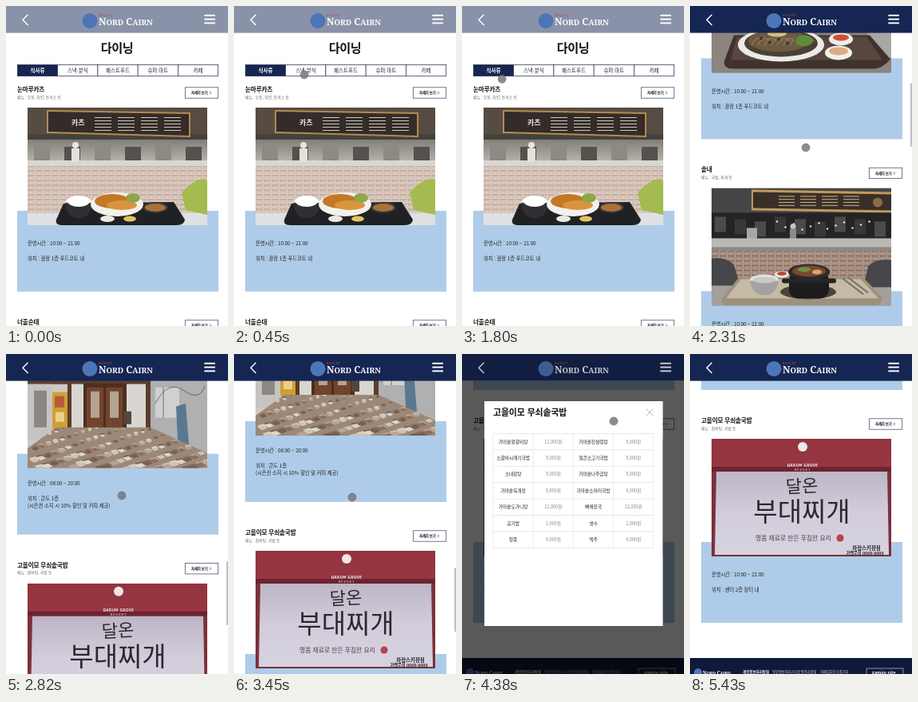
An HTML page for the animation above (5.46 s loop, 278x400 px).

```html
<!DOCTYPE html>
<html lang="ko">
<head>
<meta charset="utf-8">
<title>다이닝</title>
<style>
html, body { margin: 0; width: 100%; height: 100%; overflow: hidden; background: #fff; }
svg { display: block; }
#stage { width: 100vw; height: 100vh; }
text { font-family: "Noto Sans CJK KR", "Noto Sans CJK", "Noto Sans", sans-serif; }
.serif { font-family: "Noto Serif", "Liberation Serif", serif; }
</style>
</head>
<body>
<svg id="stage" viewBox="0 0 278 400" preserveAspectRatio="none"></svg>
<script>
const LOOP = 5460, PITCH = 291, FIRST = 104, FOOTER = 1856, PAGE = 2000;
const NAVY = '#152653', BLUE = '#aecce9', MARK = '#4d76b8';

// Drawing helpers
const rect = (x, y, w, h, fill, more = '') => `<rect x="${x}" y="${y}" width="${w}" height="${h}" fill="${fill}" ${more}/>`;
const oval = (x, y, rx, ry, fill, more = '') => `<ellipse cx="${x}" cy="${y}" rx="${rx}" ry="${ry}" fill="${fill}" ${more}/>`;
const disc = (x, y, r, fill, more) => oval(x, y, r, r, fill, more);
const shape = (d, fill) => `<path d="${d}" fill="${fill}"/>`;
const line = (d, color, width = 1) => `<path d="${d}" fill="none" stroke="${color}" stroke-width="${width}"/>`;
const text = (x, y, size, str, fill = '#222', more = '') =>
  `<text x="${x}" y="${y + size * 0.36}" font-size="${size}" fill="${fill}" ${more}>${str}</text>`;
const BOLD = 'font-weight="700" ', MID = 'text-anchor="middle" ';
const repeat = (n, fn) => Array.from({ length: n }, (_, i) => fn(i)).join('');

const bricks = (id, base, a, b) => `<pattern id="${id}" width="10" height="6" patternUnits="userSpaceOnUse">` +
  rect(0, 0, 10, 6, base) + rect(0, 0, 9, 2.4, a) + rect(-5, 3, 9, 2.4, b) + rect(5, 3, 9, 2.4, b) + '</pattern>';
const gradient = (id, ...stops) => `<linearGradient id="${id}" x2="0" y2="1">` +
  stops.map((c, i) => `<stop offset="${i / (stops.length - 1)}" stop-color="${c}"/>`).join('') + '</linearGradient>';
const defs = '<defs>' + bricks('brick', '#ddd2ca', '#c9aea2', '#d5c3b8') + bricks('darkBrick', '#b9a89c', '#8d6e60', '#a58d80') +
  gradient('panel', '#bdb5c4', '#d3cddb', '#d6d2e0') + gradient('kitchen', '#77736e', '#cfcac2') +
  gradient('awning', '#93343f', '#a33d48') + '</defs>';

// Photo scenes, each 225 x 147
const kitchen = () =>
  rect(0, 0, 225, 147, '#574c42') +
  rect(0, 34, 225, 46, 'url(#kitchen)') + rect(0, 33, 225, 7, '#45413d') +
  repeat(6, i => rect(8 + i * 38, 44 + i % 2 * 5, 20, 24, i % 2 ? '#55514c' : '#8e8982')) +
  rect(0, 66, 225, 7, '#d9d7d2') + rect(0, 73, 225, 74, 'url(#brick)');

const katsu = () => kitchen() +
  shape('M24 3L204 6L204 37L24 32Z', '#b48a50') + shape('M26 5L202 8L202 35L26 30Z', '#332c29') +
  text(55, 19, 9, '카츠', '#eee', BOLD) +
  repeat(4, i => repeat(5, j => rect(84 + i * 29, 12 + j * 4, 21, 1, '#cfc6b8'))) +
  disc(60, 47, 4, '#e9e4dd') + rect(55, 51, 10, 17, '#e4e1dc') +
  rect(0, 132, 225, 15, '#dfe0e3') +
  shape('M193 106Q212 86 225 90V134L198 128Z', '#a4bb50') +
  shape('M45 120L183 118L197 140Q196 147 187 147H43Q34 147 36 140Z', '#202124') +
  oval(64, 119, 17, 8, '#eeeeec') + shape('M47 119Q49 138 64 138Q79 138 81 119Z', '#303034') + oval(64, 117, 14, 7, '#fff') +
  oval(112, 121, 33, 15, '#f3f1ec') + oval(106, 117, 22, 9, '#c47827') + oval(118, 122, 19, 6, '#d9953d') + oval(132, 113, 9, 6, '#8ea64d') +
  oval(160, 125, 16, 7, '#3a3434') + oval(160, 125, 13, 5, '#a8713c') + oval(100, 139, 9, 4, '#eceae5') + oval(128, 139, 8, 3.5, '#e3c45e');

// Dim food court seen behind a table
const foodCourt = () =>
  rect(0, 0, 225, 147, '#464546') + shape('M50 2L225 5V31L50 28Z', '#c19a5c') + shape('M52 5L225 8V28L52 25Z', '#3a2f28') +
  repeat(4, i => repeat(4, j => rect(84 + i * 27, 10 + j * 3.8, 20, 1, '#c9b48d'))) + disc(208, 18, 6, '#8a6a48') +
  rect(0, 31, 225, 34, '#242325') + repeat(9, i => rect(4 + i * 25, 36 + i % 3 * 3, 14, 19, i % 2 ? '#38373a' : '#4c4a4b')) +
  repeat(12, i => disc(82 + i * 10.5, 42 + i * 7 % 11, 1.2, '#f2efe8')) +
  disc(102, 48, 3.5, '#cbc5bf') + rect(98, 51, 8, 13, '#8b8989') + rect(44, 50, 13, 22, '#a9a7a5') +
  rect(0, 63, 225, 16, '#bcb8b4') + rect(0, 74, 225, 5, '#8d8986') + rect(0, 79, 225, 68, 'url(#darkBrick)') +
  rect(0, 118, 225, 29, '#a39f9b') +
  shape('M0 88Q18 86 28 96L36 122H0ZM225 90Q205 88 196 98L190 124H225Z', '#47464a');

const noodles = () => foodCourt() +
  rect(0, 94, 225, 53, '#8c857e') + rect(195, 84, 30, 44, '#a9a7a6') +
  shape('M28 100H198L224 130Q214 142 202 142H28Q14 142 16 132Z', '#40332e') + shape('M32 102H194L214 131H24Z', '#57473f') +
  oval(87, 112, 54, 21, '#eceae6') + oval(87, 110, 46, 17, '#4a4034') + oval(84, 107, 38, 14, '#6d5a40') +
  repeat(9, i => line(`M${50 + i * 8} 113q7 -15 15 -5`, '#907a58', 1.2)) + repeat(6, i => disc(62 + i * 11, 104 + i * 5 % 9, 2, '#3f3529')) +
  oval(116, 107, 11, 7, '#5f8b3d') + oval(82, 98, 12, 4, '#d8bd78') +
  oval(162, 105, 15, 8, '#f0eeea') + oval(162, 103, 10, 4, '#cf5235') +
  oval(159, 122, 17, 9, '#f4f2ee') + oval(159, 120, 12, 5, '#dfab81');

const stew = () => foodCourt() +
  shape('M34 112H190L214 137Q213 147 203 147H24Q10 147 13 138Z', '#9d917c') + shape('M37 114H187L209 138H18Z', '#c5bba4') +
  oval(121, 130, 35, 9, '#4b443d') + rect(97, 105, 50, 33, '#1c1b1d', 'rx="11"') + rect(88, 113, 68, 6, '#252426', 'rx="3"') +
  oval(122, 105, 26, 10, '#2b292a') + oval(122, 104, 21, 7, '#7a4630') + oval(116, 102, 8, 3, '#6e9246') + oval(132, 105, 6, 3, '#d7a965') +
  oval(66, 115, 18, 7, '#e3e2e1') + shape('M48 116Q51 134 66 134Q81 134 84 116Z', '#a3a2a2') + oval(66, 115, 14, 4, '#c9c8c6') +
  oval(88, 108, 9, 4, '#eee') + oval(88, 107, 6, 2.5, '#bb4a34') + line('M164 113L190 133M171 112L196 131', '#77736d', 2);

const lobby = () =>
  rect(0, 0, 225, 147, '#cdc9c4') + rect(0, 0, 225, 36, '#b9b2a8') + rect(0, 36, 172, 6, '#59402f') +
  rect(50, 42, 104, 54, '#d9d6d1') + rect(0, 42, 30, 70, '#c6c4c1') + rect(8, 50, 16, 46, '#8b8884') +
  rect(31, 52, 19, 46, '#cf9f35') + rect(34, 57, 12, 14, '#b65a3a') + rect(35, 77, 11, 12, '#e9d288') +
  rect(70, 41, 54, 56, '#4d2e20') + repeat(2, i => rect(74 + i * 24, 46, 21, 50, '#71442c') + rect(79 + i * 24, 51, 11, 33, '#b5a392')) +
  rect(50, 40, 5, 60, '#5d3c2a') + rect(148, 40, 6, 60, '#5d3c2a') + rect(120, 76, 10, 16, '#54453d') +
  shape('M154 36L225 30V130L154 98Z', '#aeb0b2') + rect(160, 46, 30, 38, '#cfd0d1') +
  line('M160 66Q176 36 196 50T222 44M170 84V46', '#54565a', .8) + shape('M186 70L198 66L202 118L188 112Z', '#5a7890') +
  shape('M36 96H154L225 128V147H0V122Z', '#9b8878') +
  `<svg width="225" height="147"><clipPath id="floor"><path d="M36 96H154L225 128V147H0V122Z"/></clipPath><g clip-path="url(#floor)">` +
  repeat(190, i => {
    const y = 96 + 51 * (i * 0.618 % 1), x = 225 * (i * 0.7549 % 1), s = 2 + (y - 96) / 14;
    return shape(`M${x} ${y}l${s * 1.6} ${-s * .4}l${s} ${s * .7}l${-s * 1.4} ${s * .5}Z`, ['#cfc3b6', '#77604f', '#b9a591', '#ddd5cb', '#8b6f5c'][i % 5]);
  }) + '</g></svg>';

const banner = () =>
  rect(0, 0, 225, 147, 'url(#awning)') + rect(0, 35, 225, 6, '#6b2333') +
  rect(0, 41, 225, 106, '#7c303c') + shape('M6 41H220L222 145H4Z', 'url(#panel)') +
  disc(114, 10, 6, '#f0e6e7') +
  text(114, 33, 5, 'DARUM GROVE', '#f5e9ea', MID + BOLD + 'letter-spacing=".2"') + text(114, 38.5, 3.8, 'RESORT', '#f5e9ea', MID + 'letter-spacing="1"') +
  text(113, 59, 22, '달온', '#2c2830', MID + 'font-weight="500" transform="rotate(-3 113 59)"') +
  text(113, 91, 33, '부대찌개', '#2c2830', MID + 'font-weight="500"') +
  text(55, 124, 7.8, '명품 재료로 만든 푸짐한 요리', '#4a4046') + disc(161, 124, 4.5, '#b8404a') +
  text(194, 136.5, 6.4, '하람스키장점', '#222', MID + BOLD) + text(192, 143.2, 5.2, '가맹문의 0000-0000', '#222', MID + BOLD);

const burgers = () =>
  rect(0, 0, 225, 147, '#c9bcae') + shape('M116 0H225V32L116 24Z', '#9c8c80') +
  repeat(4, i => line(`M${126 + i * 27} 0L${140 + i * 25} 30`, '#5e4b42', 3)) + rect(172, 5, 53, 16, '#d8dde2') +
  rect(0, 0, 116, 147, '#454a52') + repeat(18, i => rect(0, i * 8, 116, 1, '#343940')) +
  shape('M116 20L225 34V53L116 47Z', '#b83c31') + shape('M116 31L225 41V44L116 36Z', '#e9dcd2') + disc(166, 41, 6, '#e9a04a') +
  shape('M116 48L225 54V90L116 89Z', '#574a43') +
  repeat(5, i => rect(119 + i * 15, 51 + i * .6, 13, 16, i % 2 ? '#e4d9c9' : '#d9a36c')) + rect(198, 55, 27, 40, '#82736a') +
  repeat(4, i => rect(122 + i * 20, 73, 11, 15, '#a69a91')) + disc(176, 77, 3.5, '#3c3230') + rect(171, 80, 10, 13, '#2f3036') +
  shape('M108 87L212 93L225 99V120L140 143H108Z', '#e5ded7') + shape('M108 86L225 93V98L108 93Z', '#713d32') +
  shape('M116 99H187V126L116 140Z', '#ded6cf') + shape('M108 141L225 115V147H108Z', '#b59b86') +
  rect(0, 139, 108, 8, '#77706a') + disc(57, 62, 34, '#2f333a') + disc(55, 61, 33, '#e9a04a');

const shop = () => kitchen() + rect(20, 6, 185, 24, '#e8e2d8') + rect(0, 96, 225, 51, '#c8b49f') +
  repeat(7, i => rect(10 + i * 31, 100, 23, 26, i % 2 ? '#eee8df' : '#9f8b78'));

const item = (name, menu, photo, open, ...place) => ({ name, menu, photo, open, place });
const food = '위치 : 광장 1층 푸드코트 내';
const tabs = [
  ['식사류', [
    item('눈마루카츠', '우동, 치킨, 돈까스 등', katsu, '10:00 ~ 21:00', food),
    item('너울순대', '순대, 막국수 등', noodles, '10:00 ~ 21:00', food),
    item('솥내', '국밥, 찌개 등', stew, '10:00 ~ 21:00', food),
    item('한식당', '백반, 찌개 등', stew, '10:00 ~ 21:00', food),
    item('콘도 식당', '조식, 한식 등', lobby, '08:00 ~ 20:00', '위치 : 콘도 1층', '(시즌권 소지 시 10% 할인 및 커피 제공)'),
    item('고을이모 무쇠솥국밥', '갈비탕, 국밥 등', banner, '10:00 ~ 21:00', '위치 : 센터 2층 장터 내')]],
  ['스낵·분식', [
    item('분식 코너', '떡볶이, 김밥 등', shop, '10:00 ~ 21:00', food),
    item('스낵 코너', '어묵, 핫바 등', shop, '10:00 ~ 21:00', food)]],
  ['패스트푸드', [
    item('도룬번', '햄버거 등', burgers, '09:00 ~ 24:00', '위치 : 광장 2층'),
    item('나루핫도그', '핫도그 등', shop, '09:00 ~ 24:00', '위치 : 광장 2층')]],
  ['슈퍼·마트', [
    item('슈퍼', '식료품 등', shop, '09:00 ~ 24:00', '위치 : 콘도 1층'),
    item('마트', '식료품 등', shop, '09:00 ~ 24:00', '위치 : 광장 1층')]],
  ['카페', [
    item('카페', '커피, 음료 등', shop, '09:00 ~ 21:00', '위치 : 광장 1층'),
    item('베이커리', '빵, 커피 등', shop, '09:00 ~ 21:00', '위치 : 콘도 1층')]]
];

function itemView({ name, menu, photo, open, place }, i) {
  const lift = place.length > 1 ? 4 : 0;
  return `<g transform="translate(0 ${FIRST + i * PITCH})">` +
    text(14, 0.3, 7.6, name, '#111', BOLD + 'letter-spacing="-.15"') + text(14, 10, 4.8, '메뉴 : ' + menu, '#666') +
    rect(224.3, -2.2, 41.4, 13.4, '#fff', 'stroke="#34405e" stroke-width=".7"') +
    text(232, 4.6, 4.4, '자세히 보기', '#111', BOLD + 'letter-spacing="-.15"') + line('M255 2.9L256.7 4.6L255 6.3', '#222', .7) +
    rect(14, 152, 252, 101, BLUE) +
    `<svg x="27" y="23" width="225" height="147">${photo()}</svg>` +
    text(27, 193 - lift, 6.4, '운영시간 : ' + open, '#222', 'letter-spacing="-.12"') +
    place.map((p, k) => text(27, 212 - lift + k * 9, 6.4, p, '#222', 'letter-spacing="-.12"')).join('') + '</g>';
}

function tabView([, items], active) {
  const bar = tabs.map(([label], i) => {
    const on = i === active, x = 14.4 + i * 50.25;
    return rect(x, 73.4, 50.25, 14.2, on ? NAVY : '#fff', 'stroke="#222c44" stroke-width=".7"') +
      text(x + 25.1, 80.3, 6.5, label, on ? '#fff' : '#222', MID + (on ? BOLD : 'font-weight="500"'));
  }).join('');
  return `<g class="tab">${bar}${items.map(itemView).join('')}</g>`;
}

const wordmark = (x, y, size) =>
  `<text class="serif" x="${x}" y="${y}" font-size="${size}" fill="#fff" font-weight="600">N<tspan font-size="${size * .8}">ORD</tspan> C<tspan font-size="${size * .8}">AIRN</tspan></text>`;

const footer = `<g transform="translate(0 ${FOOTER})">` + rect(0, 0, 278, 150, '#10193a') +
  disc(10, 18, 5, MARK) + wordmark(16, 21, 6.2) +
  text(66, 17.5, 4.5, '개인정보처리방침', '#fff', BOLD) + text(103, 17.5, 4.3, '영상정보처리기기운영관리방침', '#d5d9e4') +
  text(163, 17.5, 4.3, '이메일무단수집거부', '#d5d9e4') +
  rect(221, 13, 46, 13, 'none', 'stroke="#bfc5d4" stroke-width=".7"') + text(228, 19, 5.4, 'Family Site', '#fff', BOLD) + '</g>';

const header = rect(0, 0, 278, 33.6, NAVY, 'id="bar"') +
  line('M27.5 10.8L21 17.3L27.5 24', '#fff', 1.4) + disc(105, 18.5, 9.5, MARK) + wordmark(116, 23.6, 12) +
  text(116, 11.6, 4, 'RESORT', '#b5485a', 'letter-spacing=".3"') +
  repeat(3, i => rect(248.3, 10.8 + i * 4.8, 13.6, 1.9, '#fff'));

const dishes = [
  ['가마솥왕갈비탕', 12, '가마솥진설렁탕', 9], ['소갈비시래기국밥', 9, '얼큰소고기국밥', 9],
  ['소내장탕', 9, '가마솥나주곰탕', 9], ['가마솥육개장', 9, '가마솥소머리국밥', 9],
  ['가마솥도가니탕', 12, '뼈해장국', 12], ['공기밥', 1, '생수', 1], ['청종', 4, '맥주', 4]];
const modal = rect(0, 33.6, 278, 366.4, '#000', 'opacity=".65"') + rect(0, 0, 278, 33.6, '#000', 'opacity=".2"') +
  rect(28, 59, 223.5, 281, '#fff') + text(39, 73, 10.9, '고을이모 무쇠솥국밥', '#111', BOLD + 'letter-spacing="-.1"') +
  line('M230.5 68.5L239.5 77.5M239.5 68.5L230.5 77.5', '#999', .7) +
  repeat(8, i => line(`M39 ${99.5 + i * 20.4}H240`, '#d9d9d9', .6)) +
  repeat(5, i => line(`M${39 + i * 50.2} 99.5V242.3`, '#e0e0e0', .6)) +
  dishes.map((row, r) => row.map((cell, c) =>
    text(64.1 + c * 50.2, 109.5 + r * 20.4, c % 2 ? 5.6 : 5.8, c % 2 ? cell + ',000원' : cell, c % 2 ? '#888' : '#222',
      MID + (c % 2 ? '' : 'font-weight="500" letter-spacing="-.1"'))).join('')).join('');

const $ = id => document.getElementById(id);
$('stage').innerHTML = defs + rect(0, 0, 278, 400, '#fff') +
  `<g id="page">${text(139, 53, 15.2, '다이닝', '#111', MID + BOLD + 'letter-spacing="-.5"')}${tabs.map(tabView).join('')}${footer}</g>` +
  header + rect(276, 0, 2, 80, '#a4a4a8', 'id="thumb" rx="1"') + `<g id="modal">${modal}</g>` +
  disc(0, 0, 5, '#77777d', 'id="cursor" fill-opacity=".85" stroke="#6b6b72" stroke-width=".6"');
const views = [...document.querySelectorAll('.tab')];

// Motion
const clamp = v => Math.max(0, Math.min(1, v));
const smooth = u => u * u * (3 - 2 * u);
const ramp = (t, a, b) => clamp((t - a) / (b - a));
function track(t, keys, ease = smooth) {
  const next = keys.findIndex(k => k[0] > t);
  if (next < 0) return keys[keys.length - 1].slice(1);
  if (next === 0) return keys[0].slice(1);
  const a = keys[next - 1], b = keys[next], u = ease(ramp(t, a[0], b[0]));
  return a.slice(1).map((v, i) => v + (b[i + 1] - v) * u);
}
const cursorPath = [[60, 145, 250], [450, 88, 86], [690, 88, 86], [900, 157, 89], [1050, 157, 89], [1230, 190, 85], [1290, 190, 85],
  [1440, 240, 84], [1500, 240, 84], [1710, 42, 84], [1770, 42, 84], [1950, 145, 177], [2910, 145, 177], [3100, 148, 179],
  [3690, 148, 179], [3930, 245, 87], [4110, 245, 87], [4380, 190, 84], [4590, 235, 73], [5100, 235, 73], [5400, 290, 110]];
const scrollPath = [[1860, 0], [2310, 480], [2820, 1295], [2970, 1336], [3540, 1336], [3780, 1476]];
const tabTimes = [[0, 0], [690, 1], [930, 2], [1260, 3], [1470, 4], [1740, 0]];

function draw(t) {
  const scroll = track(t, scrollPath, t > 3000 ? smooth : u => u)[0];
  const active = tabTimes.filter(k => k[0] <= t).pop()[1];
  views.forEach((v, i) => v.setAttribute('display', i === active ? 'inline' : 'none'));
  $('page').setAttribute('transform', `translate(0 ${-scroll})`);
  $('bar').setAttribute('opacity', .5 + .5 * clamp(scroll / 90));
  $('thumb').setAttribute('y', scroll / PAGE * 400);
  $('thumb').setAttribute('opacity', .7 * ramp(t, 1860, 1920) * (1 - ramp(t, 3840, 4020)));
  const shown = ramp(t, 4080, 4200) * (1 - ramp(t, 4680, 4860));
  $('modal').setAttribute('opacity', shown);
  $('modal').setAttribute('display', shown ? 'inline' : 'none');
  const [x, y] = track(t, cursorPath);
  $('cursor').setAttribute('transform', `translate(${x} ${y})`);
  $('cursor').setAttribute('opacity', ramp(t, 60, 180) * (1 - ramp(t, 5250, 5400)));
}
const start = performance.now();
function tick(now) {
  draw(Math.max(0, now - start) % LOOP);
  requestAnimationFrame(tick);
}
draw(0);
requestAnimationFrame(tick);
</script>
</body>
</html>
```
